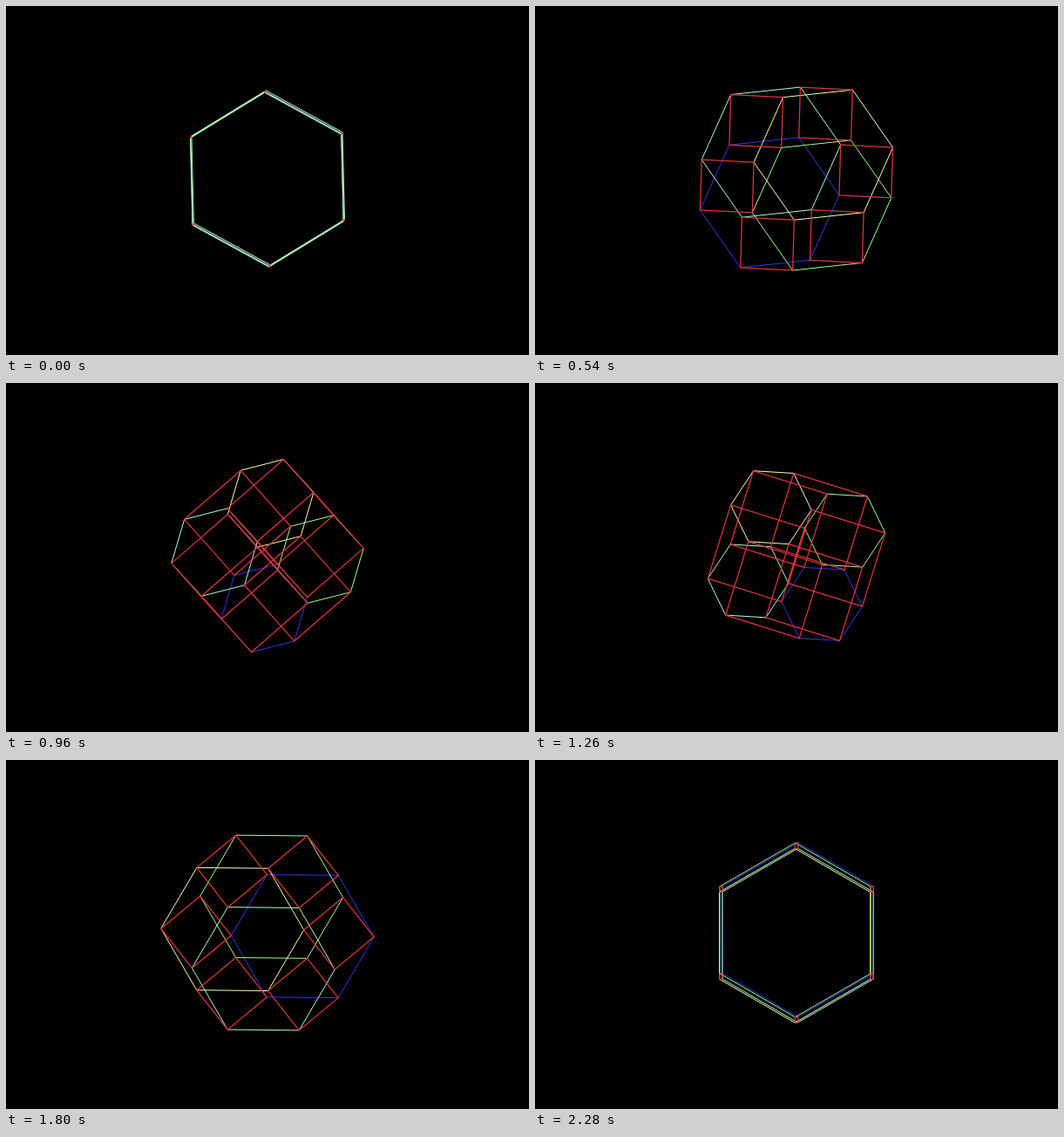
An HTML page for the animation above (2310 ms loop, 600 by 400 pixels).

```html
<!DOCTYPE html>
<html lang="en">
<head>
<meta charset="utf-8">
<title>Hexagonal duoprism</title>
<style>
html, body { margin: 0; width: 100%; height: 100%; overflow: hidden; background: #000; }
svg { display: block; width: 600px; height: 400px; }
path { fill: none; stroke-width: 1; stroke-linejoin: round; }
#squares { stroke-width: 1.25; }
</style>
</head>
<body>
<svg viewBox="0 0 600 400">
  <path id="blue" stroke="#3636e8"/>
  <path id="yellow" stroke="#ffffa8"/>
  <path id="green" stroke="#a6ff88"/>
  <path id="cyan" stroke="#a8ffe6"/>
  <path id="squares" stroke="#e0343c"/>
</svg>
<script>
const STEP = 30, COUNT = 77, CX = 300, CY = 198, EDGE = 100;
const RAD = Math.PI / 180;
const TILT = 0.892, LEAN = Math.sqrt(1 - TILT * TILT);
const WOBBLE = 0.0155;
const ORDER = ["cyan", "yellow", "green", "blue"];
const el = id => document.getElementById(id);

// Complex numbers as [re, im].
const polar = (r, a) => [r * Math.cos(a), r * Math.sin(a)];
const add = (a, b) => [a[0] + b[0], a[1] + b[1]];
const mul = (a, b) => [a[0] * b[0] - a[1] * b[1], a[0] * b[1] + a[1] * b[0]];
const conj = a => [a[0], -a[1]];
const neg = a => [-a[0], -a[1]];

const HEX = [0, 1, 2, 3, 4, 5].map(i => polar(EDGE, i * 60 * RAD));
const SQUARE = [0, 1, 2, 3].map(j => polar(EDGE / Math.SQRT2, (j * 90 - 135) * RAD));

const outline = pts =>
  "M" + pts.map(p => p[0].toFixed(2) + " " + p[1].toFixed(2)).join("L") + "Z";

// Orthographic view of a 4D hexagon x square prism under a double rotation.
// Each factor maps as a*z + b*conj(z); b comes from the slightly tilted axis.
function draw(k) {
  const half = (180 * k / COUNT - 0.8) * RAD;
  const spin = -3.125 * k * RAD;
  const hexA = mul([Math.cos(half), LEAN * Math.sin(half)], polar(1, 28.95 * RAD + spin));
  const sqA = polar(TILT * Math.sin(half), 58.6 * RAD + spin);
  const tilt = polar(WOBBLE * Math.sin(147 * RAD + spin), -19 * RAD - spin);
  const map = (a, b) => z => add(mul(a, z), mul(b, conj(z)));

  const hex = HEX.map(map(hexA, neg(mul(tilt, sqA)))).map(p => add(p, [CX, CY]));
  const sq = SQUARE.map(map(sqA, mul(tilt, hexA)));

  ORDER.forEach((id, j) => el(id).setAttribute("d", outline(hex.map(h => add(h, sq[j])))));
  el("squares").setAttribute("d", hex.map(h => outline(sq.map(s => add(h, s)))).join(""));
}

const start = performance.now();
function tick() {
  draw(Math.floor((performance.now() - start) / STEP) % COUNT);
  requestAnimationFrame(tick);
}
tick();
</script>
</body>
</html>
```
